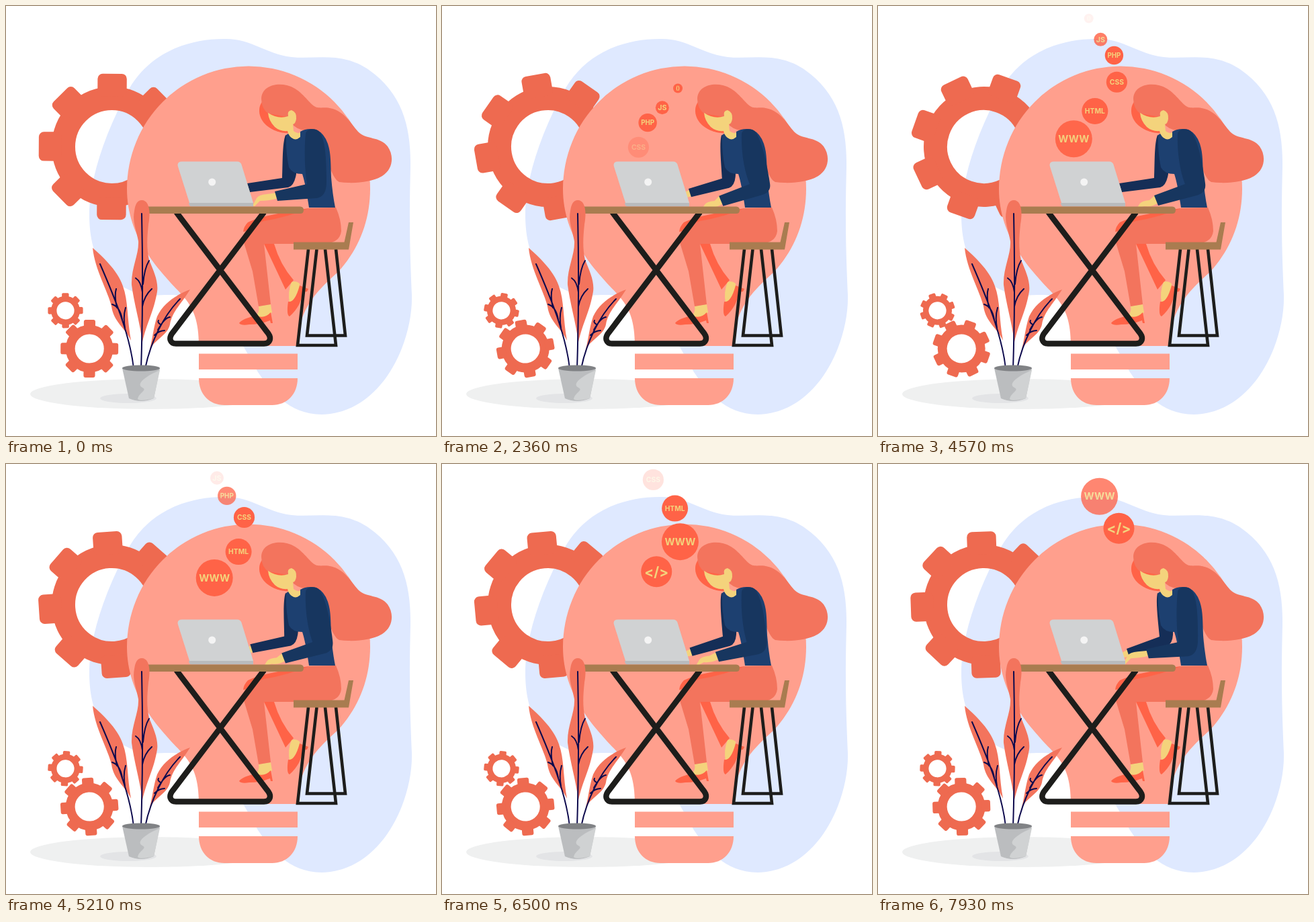
Recreate the animation shown at these times as an HTML page. Size 640x640 px, loop 8000 ms.

```html
<!DOCTYPE html>
<html lang="en">
<head>
<meta charset="utf-8">
<title>Working on ideas</title>
<style>
  html, body { margin: 0; width: 100%; height: 100%; overflow: hidden; background: #fff; }
  svg { display: block; width: 100%; height: 100%; }
  text { font-family: Inter, "Open Sans", sans-serif; font-weight: 700; fill: #f4d37c; text-anchor: middle; }
  .coral { fill: #f3745d; }
  .tomato { fill: #ff6347; }
  .skin { fill: #f4d37c; }
  .wood { fill: #a97c50; }
  .bulb { fill: #ff9f8d; }
  .line { fill: none; stroke: #1d1d1b; }
  .vein { fill: none; stroke: #0d0a4d; stroke-width: 2; stroke-linecap: round; }
</style>
</head>
<body>
<svg viewBox="0 0 640 640">
  <defs>
    <g id="gear">
      <circle r="72" fill="none" stroke="#ee6a50" stroke-width="35"/>
      <g id="teeth" fill="#ee6a50"></g>
    </g>
    <path id="track" d="M294 216C291 206 289 196 295.5 186C306 172 324 157 345.5 131.5C356 116 360 104 358 90C355 76 344.5 61 333 51.5C321 40 314 34 313.5 14"/>
  </defs>

  <ellipse cx="215" cy="577.5" rx="179" ry="22.5" fill="#eff0f0"/>
  <path fill="#dfe9ff" d="M325 49C365 48 385 71 425 76C460 80 500 67 540 95C590 130 603 180 602 240C600 320 601 360 604 430C606 500 560 606 470 608C420 608 392 570 375 545C350 500 330 460 285 437C250 425 230 433 205 430C145 415 124 370 124 310C124 260 146 190 184 122C212 75 262 49 325 49Z"/>

  <g class="spin" data-at="157.5 209.5" data-size="1" data-turn="1"></g>
  <g class="spin" data-at="88.5 453.3" data-size=".24" data-turn="-1"></g>
  <g class="spin" data-at="124.2 510" data-size=".395" data-turn="1"></g>

  <path class="bulb" d="M180 272A181 182.500 0 0 1 542 272C542 320 525 362 495 395C468 420 434 448 434 506H287C287 470 280 450 262 430C235 400 180 350 180 272ZM287 517.500H434V541H287ZM287 554H434C434 578 418 594 396 594H325C303 594 287 578 287 554Z"/>

  <g id="bubbles"></g>

  <!-- woman -->
  <path class="tomato" d="M381 143C374 152 376 168 388 178C398 186 410 190 424 189L424 165Z"/>
  <path class="coral" d="M380 138C381 120 400 114 418 118C436 122 446 138 456 147C463 154 470 150 482 152C503 156 512 173 524 187C535 199 557 194 568 209C578 223 576 243 560 253C545 262 520 265 496 262C486 258 478 230 470 200L462 186Q440 188 428 178L424 166L390 160Q380 152 380 138Z"/>
  <path class="skin" d="M390 159Q405 169 420 164Q418 156 425 155Q433 158 432 168Q431 175 427 176L428 186Q434 191 438 188L438 196Q431 202 422 197L419 186Q408 187 400 180Q391 171 390 159Z"/>
  <path id="backHand" class="skin"/>
  <path id="backArm" fill="#152e57"/>
  <path fill="#1d4070" d="M417 192L420 190Q428 204 438 195L438 187Q448 181 462 184Q474 190 479 205C484 220 483 235 484 255Q486 280 490 300H451C448 280 445 262 441 250Q426 250 421 240Q416 215 417 192Z"/>

  <path class="tomato" d="M450 301C420 306 380 312 360 322Q354 328 353 336L440 322ZM384 354L416 422L428 408Q408 385 399 354Z"/>
  <path class="skin" d="M425 411Q431 408 437 413Q438 427 430 440L422 442Q419 425 425 411ZM376 447L394 444L396 456L384 465L371 462Q378 456 376 447Z"/>
  <path class="tomato" d="M437 416L450 421L448 425L441 426Q440 446 422 462Q417 460 420 440Q430 442 437 416ZM347 472Q352 465 372 461Q385 466 394 456L397 472H394L393 468Q378 474 362 474Q350 476 347 472Z"/>
  <path class="coral" d="M451 301L491 300Q499 318 499 335Q497 352 475 354H384L394 444L376 447L367 395L354 352C349 338 360 328 384 320Q420 314 451 301Z"/>

  <!-- stool -->
  <path class="line" stroke-width="4.600" d="M462.500 362L448 490.500H505L491 362M450 362L434 505H491L475 362"/>
  <path class="wood" d="M428 351.500H503.500L510 322H517L510 362.500H428Z"/>

  <path id="frontHand" class="skin"/>
  <path id="frontArm" fill="#17365f"/>

  <!-- laptop and table -->
  <path fill="#d0d2d3" d="M262 231.500H344Q349 231.500 350.500 236L368 293V296H274L256 239Q254 231.500 262 231.500Z"/>
  <path fill="#b9bbbd" d="M272 293H368V298.500H276Q272 298 272 293Z"/>
  <circle cx="306.700" cy="262" r="5.500" fill="#f4f4f4"/>
  <path class="line" stroke-width="8.500" d="M253.500 307L388.500 485C397 495 392 502.500 384 502.500H253C245 502.500 240.500 495 249 485L384 307"/>
  <path class="wood" d="M203 298.500H438Q443 299 443 303.500Q443 309 438 309H203Z"/>

  <!-- plant -->
  <ellipse cx="182" cy="584" rx="42" ry="7" fill="#e3e4e6"/>
  <path class="coral" d="M202 289C212 289 216 303 212 325C210 345 209 360 213 378C220 395 227 410 225 425C220 455 210 470 203 500C199 470 190 440 187 415C186 390 198 370 197 350C193 330 188 320 191 305Q193 289 202 289ZM129 360C140 370 166 392 174 417C182 438 180 465 186 498C178 480 160 470 157 447C152 425 132 392 129 360ZM274 422C258 428 235 440 225 462C219 480 218 497 213 515C218 497 240 492 244 474C247 455 262 442 274 422Z"/>
  <path class="vein" d="M202 309C204 400 203 480 201 540M204 414Q206 390 213 379M203 426Q201 410 193 405M203 447Q206 431 217 421M140 384C160 430 185 490 190 540M165 449Q161 431 164 421M173 467Q170 448 158 444M177 479Q174 462 178 449M259 436C235 460 215 500 207 540M230 474Q225 471 227 468M226 482Q236 464 244 463M221 490Q228 483 236 483"/>
  <path fill="#bbbdbf" d="M173 539L183 584Q201 592 220 584L229 539Z"/>
  <path fill="#d0d2d3" d="M229 542C210 550 192 562 203 568C211 572 198 575 196 585Q200 589 220 584Z"/>
  <ellipse cx="201" cy="539" rx="28" ry="4.500" fill="#808285"/>
</svg>

<script>
const LOOP = 8000, SPEED = 0.0543;
const $ = id => document.getElementById(id);
const clamp = v => Math.max(0, Math.min(1, v));

function add(parent, name, attrs, text = '') {
  const el = document.createElementNS('http://www.w3.org/2000/svg', name);
  for (const key in attrs) el.setAttribute(key, attrs[key]);
  el.textContent = text;
  return parent.appendChild(el);
}

for (let a = 0; a < 360; a += 45)
  add($('teeth'), 'rect', { x: -21.7, y: -108.7, width: 43.4, height: 34, rx: 7.5, transform: `rotate(${a})` });

const gears = [...document.querySelectorAll('.spin')];
gears.forEach(g => add(g, 'use', { href: '#gear' }));

// label, start time, radius, font size
const bubbles = [
  ['()', 230, 7, 8], ['JS', 912, 10, 10.7], ['PHP', 1487, 13.7, 9.8], ['CSS', 2251, 15.6, 10.3],
  ['HTML', 3255, 19.5, 10.3], ['WWW', 4229, 27.5, 14.6], ['</>', 5280, 23, 20.5]
].map(([label, start, r, size]) => {
  const el = add($('bubbles'), 'g', {});
  add(el, 'circle', { r, class: 'tomato' });
  add(el, 'text', { y: size * 0.36, 'font-size': size }, label);
  return { el, start };
});

// Each limb blends between two outlines of the same structure.
const limbs = {
  backArm: ['M416 192C411 205 412 235 411 256L359 264L363 277L420 270Q429 268 432 250L432 200Z',
            'M416 192C413 205 417 235 419 257L370 275L374 287L430 271Q440 267 439 248L432 200Z'],
  backHand: ['M361 266L352 270L352 278L364 276Z',
             'M372 276L363 281L362 289L375 286Z'],
  frontArm: ['M446 190C447 182 462 181 467 188C475 200 477 225 477 262Q477 284 462 286L404 290L400 276L448 265C444 240 444 210 446 190Z',
             'M446 190C447 182 462 181 467 188C478 205 484 240 487 264Q489 278 474 282L417 297L411 282L457 265C449 245 445 215 446 190Z'],
  frontHand: ['M403 278L388 280Q376 281 373 286L367 297L370 298L378 290Q392 290 405 286Z',
              'M413 281L404 289Q392 290 389 295L386 300L389 300L397 298Q407 300 417 293Z']
};
const front = [[0, 0], [800, .12], [1290, .55], [2570, 1.15], [3430, 0], [4570, 1], [5860, .85], [7210, .35], [LOOP, -.1]];
const back = [[0, 0], [1290, .82], [3430, .62], [4570, 0], [5860, .8], [7210, .95], [LOOP, 1]];

function sample(keys, t) {
  const i = keys.findIndex(k => k[0] > t);
  const [t0, a] = keys[i - 1], [t1, b] = keys[i];
  const u = (t - t0) / (t1 - t0);
  return a + (b - a) * u * u * (3 - 2 * u);
}

function blend([from, to], k) {
  const ends = to.match(/[\d.]+/g);
  let i = 0;
  return from.replace(/[\d.]+/g, n => (+n + (ends[i++] - n) * k).toFixed(2));
}

function draw(t) {
  const angle = 0.3 + t * 0.03375;
  for (const g of gears) {
    const { at, size, turn } = g.dataset;
    g.setAttribute('transform', `translate(${at}) scale(${size}) rotate(${angle * turn})`);
  }

  for (const { el, start } of bubbles) {
    const dist = (t - start) * SPEED;
    const p = $('track').getPointAtLength(Math.max(0, dist));
    el.setAttribute('transform', `translate(${p.x} ${p.y})`);
    el.setAttribute('opacity', clamp(Math.min(dist / 20, (239.5 - dist) / 50)));
  }

  for (const id in limbs)
    $(id).setAttribute('d', blend(limbs[id], sample(id.startsWith('front') ? front : back, t)));
}

const begin = performance.now();
function tick() {
  draw((performance.now() - begin) % LOOP);
  requestAnimationFrame(tick);
}
tick();
</script>
</body>
</html>
```
